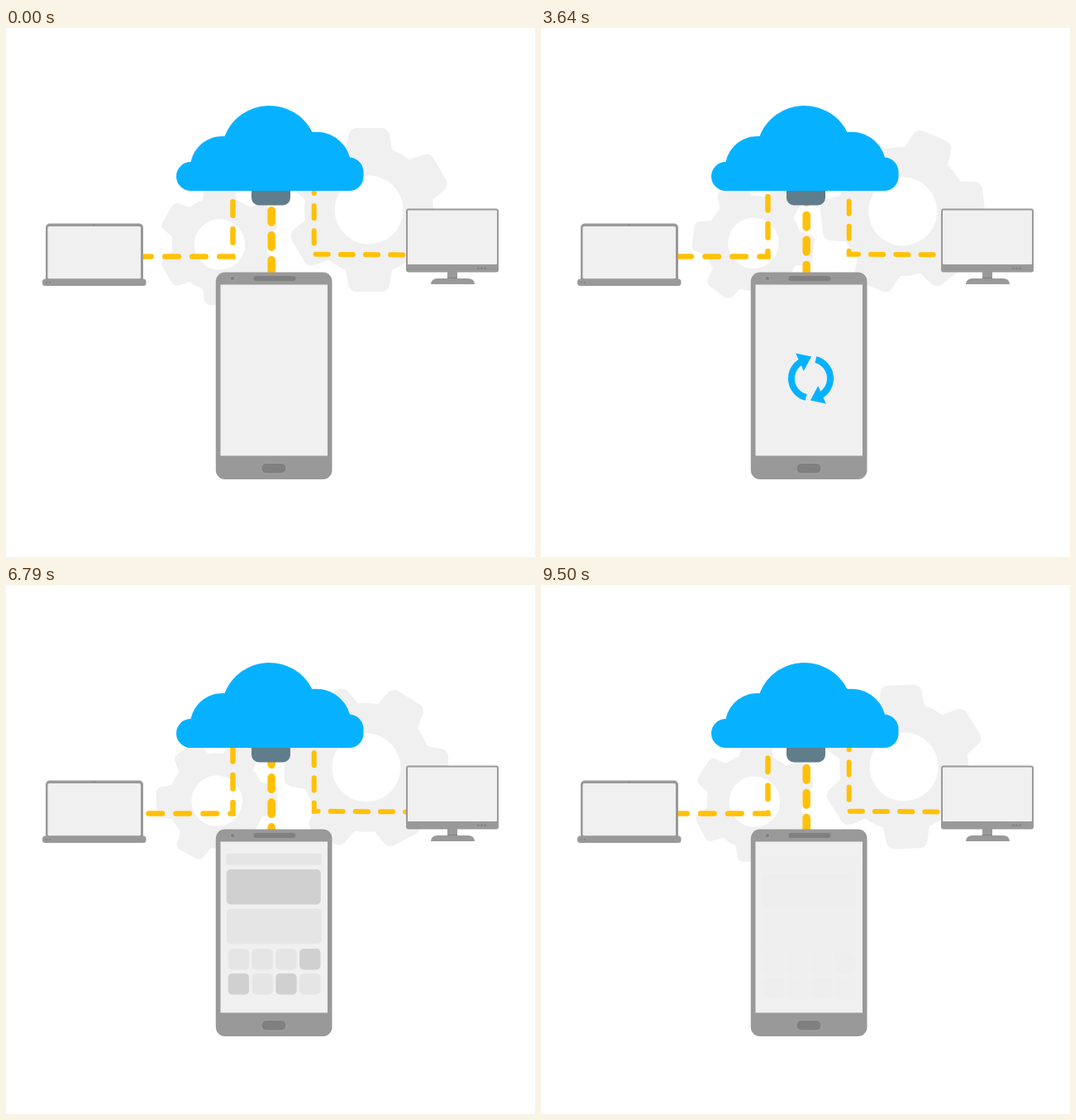
Recreate the animation shown at these times as an HTML page. Size 640 by 640 pixels, loop 9570 ms.

```html
<!DOCTYPE html>
<html lang="en">
<head>
<meta charset="utf-8">
<title>Cloud sync</title>
<style>
  html, body { margin: 0; height: 100%; overflow: hidden; background: #fff; }
  svg { display: block; width: 100vw; height: 100vh; }
  .dash { fill: none; stroke: #ffc107; stroke-linecap: round; }
  .body { fill: #999; }
  .screen { fill: #f0f0f0; }
  .detail { fill: #808080; }
  .blue { fill: #06b2ff; }
</style>
</head>
<body>
<svg viewBox="0 0 640 640">
  <defs>
    <path id="tooth" d="M-15-89H15L21-55H-21Z" fill="#f0f0f0" stroke="#f0f0f0" stroke-width="20" stroke-linejoin="round"/>
    <g id="gear">
      <circle r="78" fill="#f0f0f0"/>
      <use href="#tooth"/>
      <use href="#tooth" transform="rotate(60)"/>
      <use href="#tooth" transform="rotate(120)"/>
      <use href="#tooth" transform="rotate(180)"/>
      <use href="#tooth" transform="rotate(240)"/>
      <use href="#tooth" transform="rotate(300)"/>
      <circle r="41.5" fill="#fff"/>
    </g>
    <g id="arrow">
      <path d="M-28 .8A28 28 0 0 1 19.8-19.8" fill="none" stroke="#06b2ff" stroke-width="9.5"/>
      <path class="blue" d="M29-31 7.5-13 30.5-8Z"/>
    </g>
  </defs>

  <use id="gearLeft" href="#gear"/>
  <use id="gearRight" href="#gear"/>

  <path id="dashLeft" class="dash" stroke-width="6.5" stroke-dasharray="16.5 16.5" d="M274.5 180V276.5H150"/>
  <path id="dashMid" class="dash" stroke-width="9.5" stroke-dasharray="14.5 15.5" d="M321.2 200V305"/>
  <path id="dashRight" class="dash" stroke-width="6" stroke-dasharray="15.2 15" d="M372.7 180V273.7L495 274.5"/>

  <path fill="#607d8b" d="M297 196H344V205.500A9 9 0 0 1 335 214.500H306A9 9 0 0 1 297 205.500Z"/>
  <path class="blue" d="M223.500 197A17.500 17.500 0 0 1 223.500 162A39 39 0 0 1 264.500 131A58 58 0 0 1 370.500 126A42 42 0 0 1 416 156.500A18 18 0 0 1 432.500 174V180A17 17 0 0 1 415.500 197Z"/>

  <g id="laptop">
    <rect class="body" x="48" y="236.500" width="118" height="72" rx="5"/>
    <rect class="screen" x="50.500" y="240" width="112.500" height="63.500" rx="2"/>
    <rect class="body" x="44" y="303.500" width="125.500" height="8.500" rx="3.500"/>
    <g class="detail">
      <circle cx="49" cy="308" r="1"/><circle cx="53" cy="308" r="1"/><circle cx="106.500" cy="238.300" r=".8"/>
    </g>
  </g>

  <g id="monitor">
    <path class="body" d="M534 294H546V303H559Q566.500 303 567 310H514Q514.500 303 522 303H534Z"/>
    <rect class="detail" x="534" y="302" width="12" height="1"/>
    <rect class="body" x="484" y="218.500" width="112" height="77" rx="3"/>
    <rect class="screen" x="486" y="220.500" width="108" height="65.500" rx="1"/>
    <g class="detail">
      <circle cx="571.500" cy="290.700" r="1.300"/><circle cx="575.500" cy="290.700" r="1.300"/><circle cx="579.700" cy="290.700" r="1.300"/>
    </g>
  </g>

  <g id="phone">
    <rect class="body" x="253.800" y="295.500" width="140.700" height="250.500" rx="11"/>
    <rect class="screen" x="259.500" y="310.500" width="129.500" height="207"/>
    <g class="detail">
      <rect x="299.500" y="300" width="51" height="6" rx="3"/>
      <circle cx="274" cy="303" r="2.800" stroke="#b0b0b0" stroke-width=".7"/>
      <rect x="309" y="526.500" width="30" height="12.500" rx="6" stroke="#aaa" stroke-width=".7"/>
    </g>
  </g>

  <g id="sync">
    <use href="#arrow"/>
    <use href="#arrow" transform="rotate(180)"/>
  </g>

  <g id="tiles" fill="#e4e4e4">
    <rect x="266" y="329" width="116" height="14" rx="3.500"/>
    <rect x="266.800" y="348.300" width="114" height="42.500" rx="5" fill="#cbcbcb"/>
    <rect x="266.800" y="396" width="114.700" height="42.500" rx="5"/>
  </g>
</svg>
<script>
const FPS = 14, FRAMES = 134, PERIOD = 9570, TURNAROUND = 9.53;
const $ = id => document.getElementById(id);
const clamp = x => Math.max(0, Math.min(1, x));
const ramp = (t, from, to) => clamp((t - from) / (to - from));

// Two rows of app tiles, some of them dark
const DARK = [3, 4, 6];
for (let i = 0; i < 8; i++) {
  const tile = document.createElementNS('http://www.w3.org/2000/svg', 'rect');
  const attrs = { x: 268.7 + i % 4 * 28.8, y: i < 4 ? 444.3 : 474.4, width: 25.4, height: 25.4, rx: 5 };
  for (const name in attrs) tile.setAttribute(name, attrs[name]);
  if (DARK.includes(i)) tile.setAttribute('fill', '#cbcbcb');
  $('tiles').append(tile);
}

function placeGear(id, x, y, angle, scale) {
  $(id).setAttribute('transform', `translate(${x} ${y}) rotate(${angle}) translate(1.7 0) scale(${scale})`);
}

function setDash(id, offset) {
  $(id).setAttribute('stroke-dashoffset', offset);
}

function syncScale(t) {
  if (t <= 1) return ramp(t, 0.5, 1);
  return (1 - 0.16 * ramp(t, 1, 1.25)) * (1 - ramp(t, 5.25, 5.5));
}

function draw(t) {
  // Gears and dashes run forward, then back
  const swing = Math.min(t, TURNAROUND - t);
  const turn = 76 * swing, flow = 0.875 * swing;
  placeGear('gearLeft', 256.7, 262, turn, 0.74);
  placeGear('gearRight', 437.4, 220, -turn, 1);
  setDash('dashLeft', -96.25 + 33 * flow);
  setDash('dashMid', -20.75 - 30 * flow);
  setDash('dashRight', -95.5 + 30.2 * flow);

  const spin = 270 * Math.max(0, Math.min(t, 5.25) - 1.25);
  const scale = syncScale(t);
  $('sync').setAttribute('transform', `translate(326.5 424) rotate(${spin}) scale(${scale})`);
  $('sync').setAttribute('visibility', scale > 0 ? 'visible' : 'hidden');

  const enter = ramp(t, 5.5, 7);
  $('tiles').setAttribute('transform', `translate(0 ${30 * (enter - 1)})`);
  $('tiles').setAttribute('opacity', enter * (1 - ramp(t, 8.07, 9.57)));
}

const start = performance.now();
function tick() {
  const ms = (performance.now() - start) % PERIOD;
  draw(Math.min(FRAMES - 1, Math.floor((ms + 5) * FPS / 1000)) / FPS);
  requestAnimationFrame(tick);
}
tick();
</script>
</body>
</html>
```
